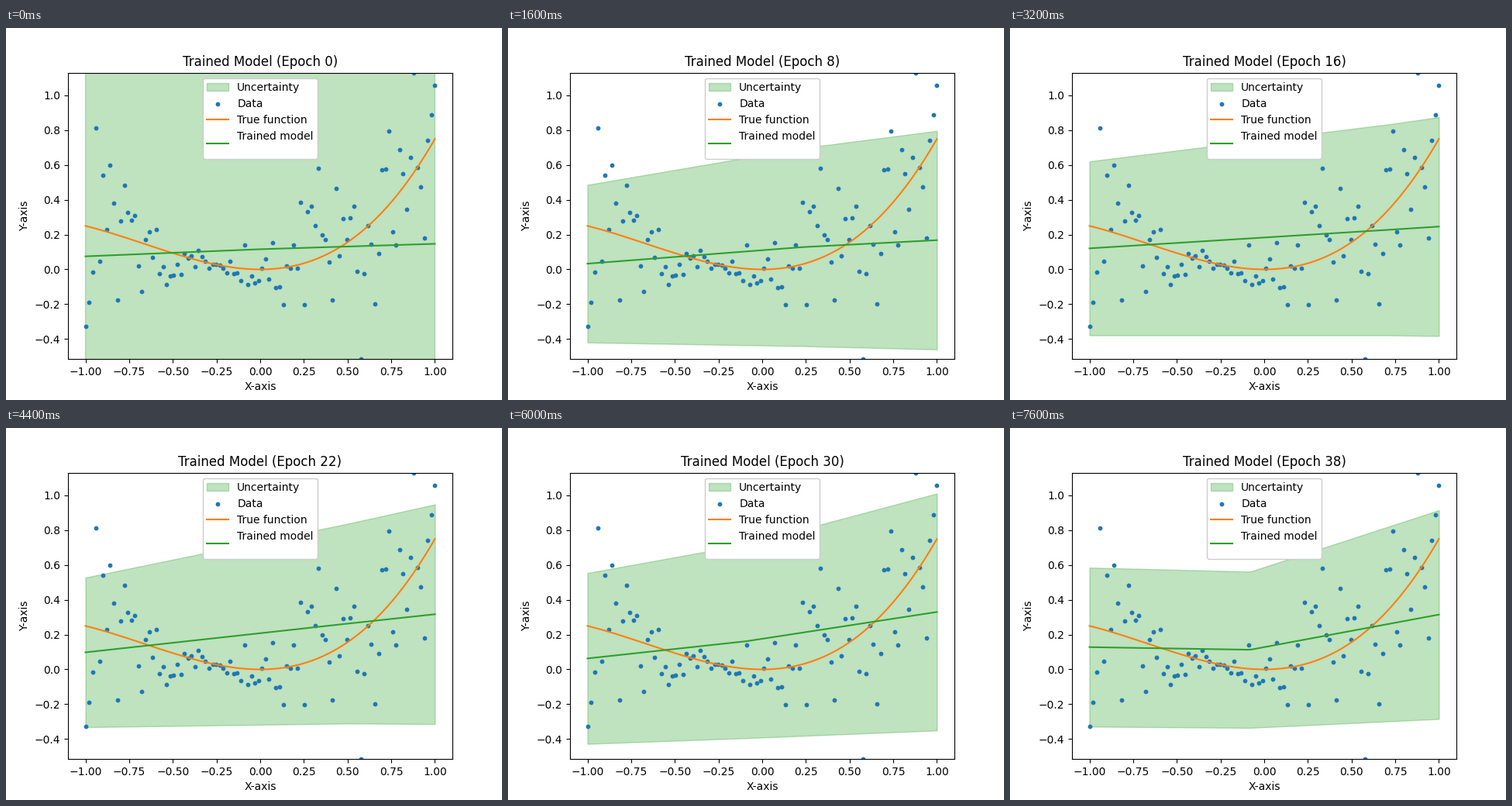
A matplotlib script for the animation above (8000 ms loop, 640 px wide and 480 px high).

```python
import numpy as np
import matplotlib.pyplot as plt
from matplotlib.animation import FuncAnimation

FRAMES, INTERVAL, EPOCH_STEP = 20, 400, 2
BLOCK = 16

# key epochs: knot position, then model mean and band half-width
# at the left end, the knot and the right end
KEYS = {
    0: (0, .075, .116, .147, 1.15, 1.15, 1.15),
    4: (.21, .075, .231, .297, .348, .612, .786),
    8: (.23, .033, .128, .168, .453, .569, .628),
    10: (.4, 0, .11, .15, .52, .63, .69),
    16: (.72, .121, .228, .246, .5, .607, .629),
    22: (.5, .098, .263, .317, .43, .574, .631),
    27: (.4, .03, .22, .295, .51, .6, .645),
    30: (-.09, .063, .162, .33, .491, .557, .681),
    38: (-.08, .128, .113, .315, .457, .449, .6),
}


def box_muller(u):
    """Turn one block of uniforms into normals, half cosine and half sine."""
    u1, u2 = np.split(u, 2)
    radius, angle = np.sqrt(-2 * np.log(1 - u1)), 2 * np.pi * u2
    return np.r_[radius * np.cos(angle), radius * np.sin(angle)]


def normals(count, seed):
    rng = np.random.RandomState(seed)

    def uniforms(n):
        return (rng.randint(0, 2**32, n, dtype=np.uint32) % 2**24) / 2**24

    values = uniforms(count)
    for start in range(0, count - BLOCK + 1, BLOCK):
        block = slice(start, start + BLOCK)
        values[block] = box_muller(values[block])
    # an incomplete last block is drawn again
    if count % BLOCK:
        values[-BLOCK:] = box_muller(uniforms(BLOCK))
    return values


def predict(epoch):
    knot, *levels = [np.interp(epoch, list(KEYS), track)
                     for track in zip(*KEYS.values())]
    knots = (-1, knot, 1)
    return np.interp(x, knots, levels[:3]), np.interp(x, knots, levels[3:])


def band_outline(mean, half):
    return np.column_stack([np.r_[x, x[::-1]],
                            np.r_[mean - half, (mean + half)[::-1]]])


x = np.linspace(-1, 1, 100)
truth = 0.5 * x**2 + 0.25 * x**3
samples = truth + (0.1 + 0.4 * x) * normals(len(x), seed=42)

fig, ax = plt.subplots(figsize=(6.4, 4.8), dpi=100)
mean0, half0 = predict(0)
band = ax.fill_between(x, mean0 - half0, mean0 + half0, color="tab:green",
                       alpha=0.3, label="Uncertainty")
ax.scatter(x, samples, s=10, color="tab:blue", label="Data")
ax.plot(x, truth, color="tab:orange", label="True function")
model, = ax.plot(x, mean0, color="tab:green", label="Trained model\n")
ax.set_xlim(-1.1, 1.1)
ax.set_ylim(samples.min(), samples.max())
ax.set_xlabel("X-axis")
ax.set_ylabel("Y-axis")
title = ax.set_title("Trained Model (Epoch 0)")
ax.legend(loc="upper center", framealpha=1)


def update(frame):
    epoch = frame * EPOCH_STEP
    mean, half = predict(epoch)
    band.set_verts([band_outline(mean, half)])
    model.set_ydata(mean)
    title.set_text(f"Trained Model (Epoch {epoch})")
    return band, model, title


anim = FuncAnimation(fig, update, frames=FRAMES, interval=INTERVAL,
                     repeat=True, repeat_delay=0)
plt.show()
```
